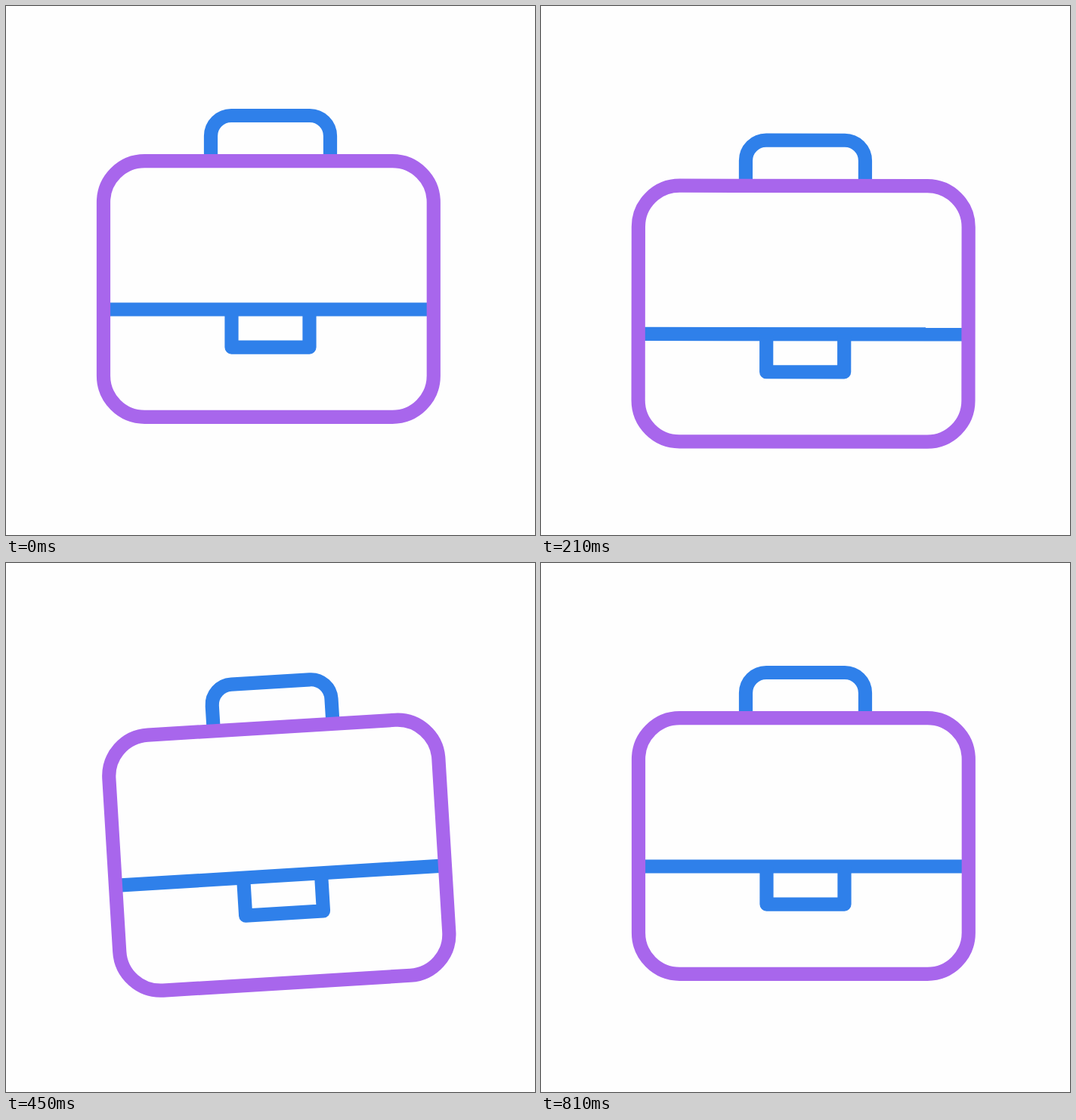
Recreate the animation shown at these times as an HTML page. Size 700 by 700 pixels, loop 2840 ms.

```html
<!DOCTYPE html>
<html lang="en">
<head>
<meta charset="utf-8">
<title>Briefcase</title>
<style>
  html, body { margin: 0; width: 100%; height: 100%; overflow: hidden; background: #fefefe; }
  svg { display: block; width: 100%; height: 100%; }
</style>
</head>
<body>
<svg viewBox="0 0 700 700">
  <g id="bag" fill="none" stroke-width="18.2" stroke="#2f80ea">
    <path d="M271 200V172a27 27 0 0 1 27-27H402a27 27 0 0 1 27 27V200"/>
    <path d="M132 401.5H563"/>
    <path d="M298.5 402V451.6H401.5V402" stroke-linejoin="round"/>
    <rect x="129" y="205.2" width="436.8" height="338.6" rx="54.5" stroke="#a866ec"/>
  </g>
</svg>
<script>
const bag = document.getElementById("bag");
const LOOP = 2840, STEP = 30, END = 27;

// Swing extremes: [step, degrees]
const swings = [[0, 0], [5, -9.1], [9.4, 12.1], [16, -4.5], [19.7, 2.3], [23.7, -1], [END, 0]];
const smooth = u => u * u * (3 - 2 * u);

function angle(s) {
  const i = Math.max(1, swings.findIndex(([at]) => at >= s));
  const [t0, a0] = swings[i - 1], [t1, a1] = swings[i];
  return a0 + (a1 - a0) * smooth((s - t0) / (t1 - t0));
}

// Quick drop, then a slow start back up
function drop(s) {
  const PEAK = 5, BACK = 17, DEPTH = 33;
  if (s >= BACK) return 0;
  return DEPTH * (1 - (s < PEAK ? (1 - s / PEAK) ** 2 : ((s - PEAK) / (BACK - PEAK)) ** 2.6));
}

function draw() {
  const s = Math.min(END, Math.floor(performance.now() % LOOP / STEP));
  bag.setAttribute("transform", `translate(0 ${drop(s)}) rotate(${angle(s)} 350 145)`);
  requestAnimationFrame(draw);
}
draw();
</script>
</body>
</html>
```
